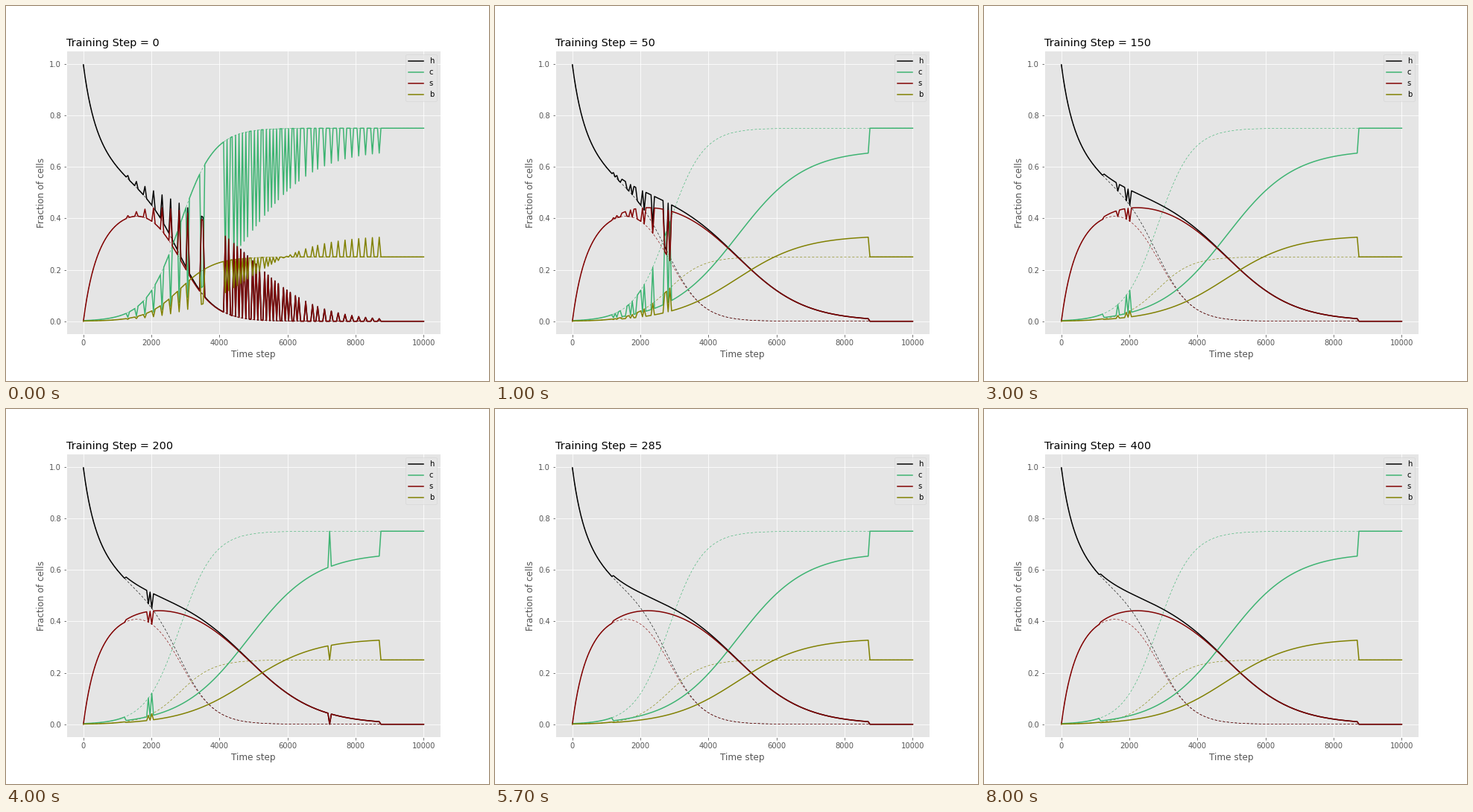
Write a matplotlib script that moves like this. It is 648 by 504 pixels and loops after 8100 ms.

```python
import numpy as np
import matplotlib.pyplot as plt
from matplotlib.animation import FuncAnimation

FRAMES = 81
INTERVAL = 100
STEP_SIZE = 5
COLORS = {"h": "black", "c": "mediumseagreen", "s": "maroon", "b": "olive"}

time = np.linspace(0, 10000, 200)
index = np.arange(time.size)
ONSET, END = 23, 173  # range of time steps where treatment pays off


def fractions(logit, b_share):
    """Fractions h, c, s, b: logistic takeover, with h relaxing towards s."""
    grown = 1 / (1 + np.exp(-logit))
    relax = 0.00105 * time + 0.5 * (1 - np.exp(-time / 500))
    s_share = 0.5 * (1 - np.exp(-relax))
    return np.array([(1 - grown) * (1 - s_share), grown * (1 - b_share),
                     (1 - grown) * s_share, grown * b_share])


untreated = fractions(0.002 * time - 5.67, 1 / 4)
treated = fractions(0.00101 * time - 4.9 - 0.7 * np.exp(-time / 900), 1 / 3)


def first_policy():
    """Sparse treatment: early probes, one longer dose, then widening gaps."""
    early = np.arange(26, 62, 5)
    i = np.arange(32)
    late = np.rint(83 + 2.25 * i + 1.65 * np.maximum(i - 19, 0))
    return np.isin(index, np.concatenate([early, [69, 70], late]))


rng = np.random.default_rng(7)
optimal = (index >= ONSET) & (index <= END)
initial = first_policy()

# Late time steps are learned quickly, those just after the onset slowly
learning_rate = 0.04 + 0.55 * np.clip((time - 1400) / 2600, 0, 1) ** 2
settle = np.clip(rng.exponential(1 / learning_rate), 1, 53)
settle[ONSET] = 69


def explore(frame):
    """Random trial flips that die out as training goes on."""
    trial = np.random.default_rng(frame)
    count = trial.poisson(5 * np.exp(-frame / 15)) if 0 < frame < 50 else 0
    return np.isin(index, (2 + 170 * trial.random(count) ** 3).astype(int))


def policy(frame):
    return np.where(frame < settle, initial, optimal) ^ explore(frame)


plt.style.use("ggplot")
fig, ax = plt.subplots(figsize=(9, 7), dpi=72)
fig.subplots_adjust(left=0.125, right=0.9, bottom=0.125, top=0.88)

for values, color in zip(untreated, COLORS.values()):
    ax.plot(time, values, color=color, lw=0.6, dashes=(5, 4))
lines = [ax.plot([], [], color=color, lw=1.5, label=name)[0]
         for name, color in COLORS.items()]

ax.set_xlim(-500, 10500)
ax.set_ylim(-0.05, 1.05)
ax.set_xlabel("Time step")
ax.set_ylabel("Fraction of cells")
ax.legend(loc="upper right")
title = ax.set_title("", loc="left")


def update(frame):
    values = np.where(policy(frame), treated, untreated)
    for line, row in zip(lines, values):
        line.set_data(time, row)
    title.set_text(f"Training Step = {frame * STEP_SIZE}")
    return [*lines, title]


anim = FuncAnimation(fig, update, frames=FRAMES, interval=INTERVAL,
                     repeat=True, repeat_delay=0)
plt.show()
```
